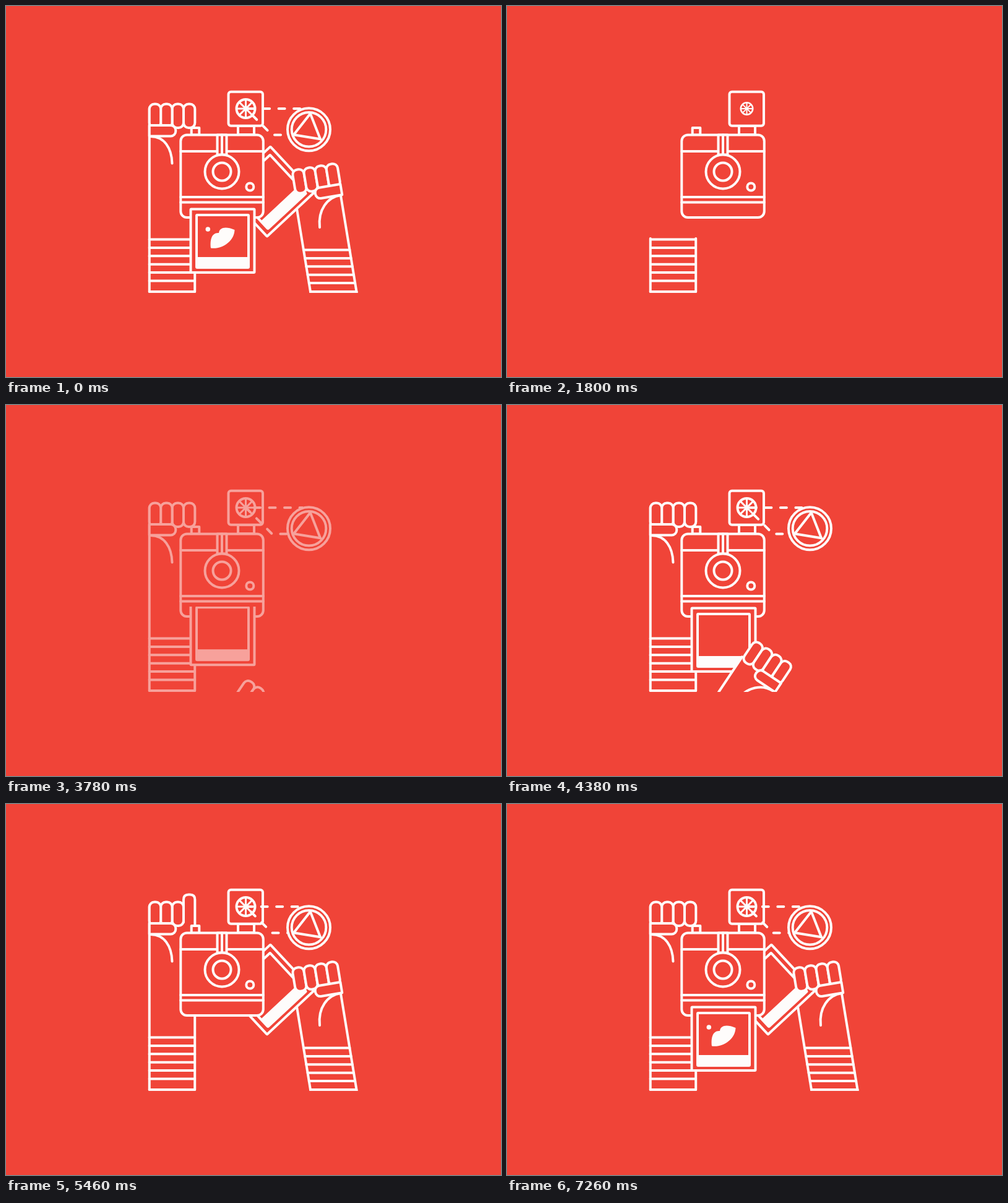
An HTML page with a canvas that plays this animation: 800 px wide and 600 px high, repeating every 7.29 s.

```html
<!DOCTYPE html>
<html lang="en">
<head>
<meta charset="utf-8">
<title>Instant camera</title>
<style>
html, body { margin: 0; width: 100%; height: 100%; overflow: hidden; background: #f04438; }
canvas { display: block; width: 800px; height: 600px; }
</style>
</head>
<body>
<canvas id="stage" width="800" height="600"></canvas>
<script>
const ctx = document.getElementById('stage').getContext('2d');
const LOOP = 7290;
const BG_RGB = [240, 68, 56], INK_RGB = [254, 252, 251];
const BG = `rgb(${BG_RGB})`;
const TAU = Math.PI * 2, DEG = Math.PI / 180;

const clamp = x => Math.min(1, Math.max(0, x));
const lerp = (a, b, p) => a + (b - a) * p;
const linear = p => p;
const out = p => 1 - (1 - p) ** 3;
const inOut = p => p < .5 ? 4 * p ** 3 : 1 - 4 * (1 - p) ** 3;
const back = p => 1 + 1.9 * (p - 1) ** 3 + .9 * (p - 1) ** 2;
const span = (t, a, b, ease = inOut) => ease(clamp((t - a) / (b - a)));

// Steps are [time, value, value...]; a step may end with its easing
function track(steps, t) {
  let i = 0;
  while (i < steps.length - 1 && t >= steps[i + 1][0]) i++;
  const a = steps[i], b = steps[i + 1];
  const values = a.slice(1).filter(v => typeof v === 'number');
  if (!b || t < a[0]) return values;
  const last = b[b.length - 1];
  const p = span(t, a[0], b[0], typeof last === 'function' ? last : inOut);
  return values.map((v, k) => lerp(v, b[k + 1], p));
}

const GLOW = [[0, 1], [500, 1], [650, 0, linear], [770, 0], [780, 1], [3500, 1],
  [3590, 0, linear], [3690, 0], [3870, 1, linear], [5780, 1], [5870, 0, linear],
  [5970, 0], [6150, 1, linear]];
const PRESS = [[0, 0], [2650, 0], [2850, -11, out], [3230, -11], [3350, 5], [3420, 5],
  [3540, 0], [5050, 0], [5250, -12, out], [5600, -12], [5740, 5], [6060, 5], [6220, 0]];
const CARRY = [[3660, 318, 551, 2], [4080, 350, 379.5, 0, out], [4440, 350, 379.5, 0],
  [4920, 398.3, 416.7, -2], [5400, 424.5, 300, -43]];
const SIDES = [[1530, 462], [1790, 376, out], [1830, 376], [2250, 342], [2520, 165]];

let ink;
const mix = a => `rgb(${BG_RGB.map((v, i) => Math.round(lerp(v, INK_RGB[i], a)))})`;

function paint(build, fill) {
  ctx.beginPath();
  build();
  if (fill) { ctx.fillStyle = fill; ctx.fill(); }
  ctx.stroke();
}
function line(...pts) {
  paint(() => {
    for (let i = 0; i < pts.length; i += 2) ctx.lineTo(pts[i], pts[i + 1]);
  });
}
const box = (x, y, w, h, r = 0, fill = BG) => paint(() => ctx.roundRect(x, y, w, h, r), fill);
const disc = (x, y, r, fill) => paint(() => ctx.arc(x, y, r, 0, TAU), fill);

function scaled(x, y, s, draw) {
  if (s <= .01) return;
  ctx.save();
  ctx.translate(x, y);
  ctx.scale(s, s);
  ctx.translate(-x, -y);
  draw();
  ctx.restore();
}

function finger(i, top, bottom, open) {
  const x = 231.75 + 18.4 * i, w = 18.4, r = 8;
  paint(() => {
    if (open) {
      ctx.moveTo(x, 191);
      ctx.lineTo(x, top + r);
      ctx.quadraticCurveTo(x, top, x + r, top);
      ctx.lineTo(x + w - r, top);
      ctx.quadraticCurveTo(x + w, top, x + w, top + r);
      ctx.lineTo(x + w, 197);
    } else ctx.roundRect(x, top, w, bottom - top, Math.min(r, (bottom - top) / 2));
  }, BG);
}

function hand(t, press) {
  for (let i = 3; i >= 0; i--) {
    const p = span(t, 2400 + i * 80, 2600 + i * 80, out);
    if (!p) continue;
    const dy = i === 3 ? press : 0;
    finger(i, lerp(194, 158.5 + dy, p), 197 + Math.max(0, dy), dy < -1);
  }
  const p = span(t, 2380, 2580, out);
  if (p) box(231.75, 193, 42.5 * p, 17.5, [0, 8 * p, 8 * p, 0]);
}

function leftArm(t, press) {
  if (t < 1530) return;
  const mid = 268.4, half = 36.7;
  const base = half * span(t, 1520, 1600, out);
  line(mid - base, 462, mid + base, 462);
  const [top] = track(SIDES, t);
  line(231.75, 462, 231.75, top);
  line(305.2, 462, 305.2, Math.max(top, 215));
  const w = half * span(t, 1590, 1900, out);
  for (let i = 0; i < 6; i++) {
    const y = 377.5 + 13.4 * i;
    if (w) line(mid - w, y, mid + w, y);
  }
  const p = span(t, 2350, 2650);
  if (p) {
    ctx.setLineDash([62 * p, 200]);
    paint(() => { ctx.moveTo(234, 211); ctx.bezierCurveTo(256, 211, 268, 230, 268.5, 255.5); });
    ctx.setLineDash([]);
  }
  hand(t, press);
}

function camera(t, press) {
  const neck = span(t, 1050, 1200, out);
  if (neck) box(375, 208 - 14 * neck, 26, 14 * neck);
  scaled(387.5, 193, span(t, 1120, 1420, back), () => box(359.5, 138.7, 55.5, 55, 4));
  const knob = 11.5 * span(t, 1250, 1400, out);
  if (knob) {
    const y = 208.5 - knob + Math.max(0, press) * 1.4;
    box(299.7, y, 12.6, 208.5 - y);
  }
  scaled(349, 275, span(t, 775, 1080, back), () => box(282.3, 208.5, 133.5, 133.5, 10));

  const w = 66.7 * span(t, 950, 1200, out);
  if (w) for (const y of [235, 309, 317.5]) line(349 - w, y, 349 + w, y);
  const strip = span(t, 1000, 1180, out);
  if (strip) {
    box(341.5, 208.5, 15, 32 * strip);
    line(349, 208.5, 349, 208.5 + 32 * strip);
  }
  scaled(349, 268, span(t, 980, 1250, back), () => disc(349, 268, 27.5, BG));
  scaled(349, 268, span(t, 1080, 1330, back), () => disc(349, 268, 14.5));
  scaled(394.3, 292.5, span(t, 1200, 1420, back), () => disc(394.3, 292.5, 6));

  scaled(387.5, 166, span(t, 1640, 1930, inOut), () => {
    disc(387.5, 166, 15);
    ctx.lineWidth = 3;
    for (let i = 0; i < 4; i++) {
      const dx = 14 * Math.cos(i * TAU / 8), dy = 14 * Math.sin(i * TAU / 8);
      line(387.5 - dx, 166 - dy, 387.5 + dx, 166 + dy);
    }
  });
}

function photo(picture = 0) {
  box(298.5, 328.5, 103, 102.5, 1);
  box(308, 338, 84, 85, 1);
  ctx.fillStyle = ink;
  ctx.fillRect(308, 406, 84, 17);
  if (!picture) return;
  ctx.globalAlpha = picture;
  ctx.beginPath();
  ctx.arc(326.3, 361, 3.8, 0, TAU);
  ctx.moveTo(331, 391.5);
  ctx.bezierCurveTo(329.5, 379, 332, 366, 344, 367);
  ctx.bezierCurveTo(345, 358, 355, 356, 369.5, 362);
  ctx.bezierCurveTo(369, 380, 350, 394, 331, 391.5);
  ctx.fill();
  ctx.globalAlpha = 1;
}

function print(t) {
  const second = t >= 5910 || t < 780;
  const p = second ? (t < 780 ? 1 : span(t, 5910, 6310, linear)) : span(t, 3420, 3820, linear);
  if (!p || (!second && t >= 4440)) return;
  ctx.save();
  ctx.beginPath();
  ctx.rect(290, 326, 120, 120);
  ctx.clip();
  ctx.translate(0, -111 * (1 - p));
  photo(second ? (t < 780 ? 1 : span(t, 6400, 6950)) : 0);
  ctx.restore();
}

// Right arm and the photo it carries, posed as one rigid piece
function carrier(t) {
  if (t < 3660) return;
  const [x, y, turn] = track(CARRY, t);
  const left = v => 492 + (v - 462) * .164, right = v => 566.5 + (v - 462) * .164;
  ctx.save();
  ctx.translate(x, y);
  ctx.rotate((turn + 43) * DEG);
  ctx.translate(-424.5, -300);

  ctx.fillStyle = BG;
  ctx.beginPath();
  for (const [px, py] of [[left(300), 300], [right(300), 300], [right(640), 640], [left(640), 640]])
    ctx.lineTo(px, py);
  ctx.fill();
  line(left(300), 300, left(640), 640);
  line(right(300), 300, right(640), 640);
  for (let i = 0; i < 5; i++) {
    const v = 394.5 + 13.4 * i;
    line(left(v), v, right(v), v);
  }
  paint(() => { ctx.moveTo(541, 306); ctx.bezierCurveTo(519, 309, 504, 330, 507, 358); });

  if (t >= 4440) {
    ctx.save();
    ctx.translate(424.5, 300);
    ctx.rotate(-43 * DEG);
    ctx.translate(-350, -379.7);
    photo();
    ctx.restore();
  }
  ctx.translate(498.5, 260);
  ctx.rotate(-9.4 * DEG);
  ctx.scale(-1, 1);
  ctx.translate(-268.5, -158.5);
  hand(LOOP, 0);
  ctx.restore();

  const w = 37.3 * span(t, 5380, 5480, out);
  if (w) line(529.3 - w, 462, 529.3 + w, 462);
}

function rays(t, clock) {
  const p = span(t, 1900, 2280, linear);
  if (!p) return;
  const phase = 4 + (clock - LOOP) * .109;
  ctx.save();
  ctx.beginPath();
  ctx.rect(380, 140, 100 * p, 90);
  ctx.clip();
  ctx.setLineDash([10, 14.5]);
  ctx.lineDashOffset = -phase;
  line(387.5, 166, 489, 166);
  ctx.lineDashOffset = -phase - 11;
  line(387.5, 166, 430, 208.5, 458, 208.5);
  ctx.restore();
}

function badge(t) {
  const x = 489.5, y = 199.7;
  const sweep = span(t, 2280, 2700);
  if (!sweep) return;
  ctx.fillStyle = BG;
  ctx.beginPath();
  ctx.arc(x, y, 34.5 * sweep, 0, TAU);
  ctx.fill();

  const solid = span(t, 2880, 3030, linear);
  const step = TAU * 34.5 / 24, dash = lerp(4.2, step, Math.max(0, solid));
  ctx.save();
  if (solid < 1) ctx.setLineDash([dash, step - dash]);
  paint(() => ctx.arc(x, y, 34.5, -TAU / 2, TAU * (sweep - .5)));
  ctx.restore();

  const inner = span(t, 2450, 2960, linear);
  if (inner) paint(() => ctx.arc(x, y, 27.8, 0, TAU * inner));

  const base = span(t, 2550, 2760);
  if (base) line(465, 208.3, lerp(465, 508, base), lerp(208.3, 215.3, base));
  const side = span(t, 2750, 3000, linear);
  if (side) {
    line(465, 208.3, lerp(465, 491.8, side), lerp(208.3, 174, side));
    line(508, 215.3, lerp(508, 491.8, side), lerp(215.3, 174, side));
  }
}

function draw(now) {
  const t = now % LOOP;
  ctx.fillStyle = BG;
  ctx.fillRect(0, 0, 800, 600);
  const [glow] = track(GLOW, t);
  if (glow > 0) {
    // The opening moments hold the finished pose
    const pose = t < 780 ? t + LOOP : t;
    const [press] = track(PRESS, pose);
    ink = mix(glow);
    ctx.save();
    ctx.beginPath();
    ctx.rect(0, 0, 800, 464);
    ctx.clip();
    ctx.strokeStyle = ink;
    ctx.lineWidth = 4;
    ctx.lineCap = 'round';
    ctx.lineJoin = 'round';
    leftArm(pose, press);
    if (pose >= 4920) carrier(pose);
    camera(pose, press);
    print(t);
    if (pose < 4920) carrier(pose);
    rays(pose, pose);
    badge(pose);
    ctx.restore();
  }
}

const start = performance.now();
function tick() {
  draw(performance.now() - start);
  requestAnimationFrame(tick);
}
tick();
</script>
</body>
</html>
```
